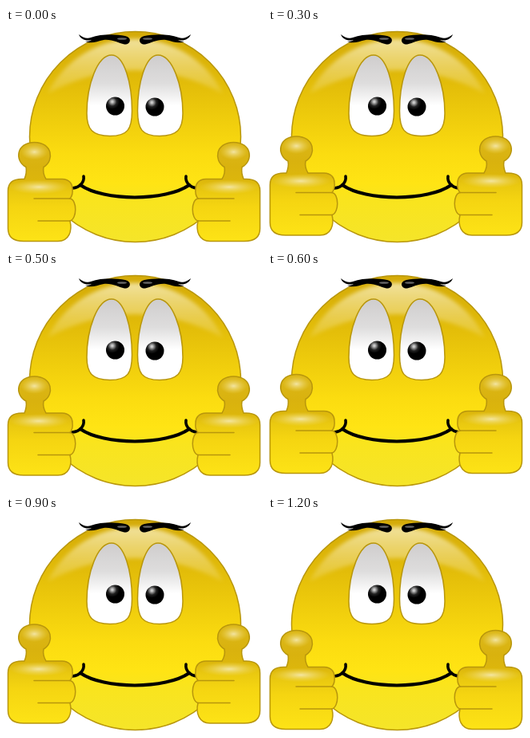
An HTML page for the animation above (1.3 s loop, 320x271 px).

```html
<!DOCTYPE html>
<html lang="en">
<meta charset="utf-8">
<title>Thumbs up</title>
<style>
html, body { margin: 0; height: 100%; overflow: hidden; background: #fff; }
svg { display: block; width: 320px; height: 271px; }
</style>
<svg viewBox="0 0 320 271">
  <defs>
    <linearGradient id="skin" x2="0" y2="1">
      <stop stop-color="#d4aa08"/>
      <stop offset=".2" stop-color="#dfb808"/>
      <stop offset=".4" stop-color="#eecb0c"/>
      <stop offset=".58" stop-color="#fbdc10"/>
      <stop offset=".72" stop-color="#ffe414"/>
      <stop offset=".8" stop-color="#f9e41e"/>
      <stop offset="1" stop-color="#f5e529"/>
    </linearGradient>
    <linearGradient id="shine" x2="0" y2="1">
      <stop stop-color="#f6ebb6" stop-opacity=".85"/>
      <stop offset="1" stop-color="#f3e08a" stop-opacity=".25"/>
    </linearGradient>
    <linearGradient id="white" x2="0" y2="1">
      <stop stop-color="#cfcdcd"/>
      <stop offset=".35" stop-color="#dedddd"/>
      <stop offset=".62" stop-color="#fff"/>
    </linearGradient>
    <linearGradient id="glove" x2="0" y2="1">
      <stop stop-color="#dcb81a"/>
      <stop offset=".25" stop-color="#d9b20e"/>
      <stop offset=".38" stop-color="#dcb60c"/>
      <stop offset=".5" stop-color="#eac910"/>
      <stop offset=".65" stop-color="#f5d511"/>
      <stop offset="1" stop-color="#fde316"/>
    </linearGradient>
    <radialGradient id="glow">
      <stop stop-color="#f5e9b0" stop-opacity=".9"/>
      <stop offset="1" stop-color="#f0d860" stop-opacity="0"/>
    </radialGradient>
    <radialGradient id="ball" cx=".34" cy=".26" r=".4">
      <stop offset=".1" stop-color="#ccc"/>
      <stop offset=".6" stop-color="#222"/>
      <stop offset="1" stop-color="#000"/>
    </radialGradient>
    <filter id="soft"><feGaussianBlur stdDeviation="2.5"/></filter>
    <g id="half">
      <path fill="url(#white)" stroke="#b8960c" stroke-width="1.5" d="M132 34C148 34 157.5 70 157.5 104C157.5 127 152 135.5 130 135.5C108 135.5 101 127 101 107C101 72 114 34 132 34Z"/>
      <path d="M91 8C96 12 101 14 106 12C120 7 138 8 149 10C158 12 156 21 148 20.5C140 19 134 14 122 15C113 17 107 20 99 17C103 17 106 16 107 15C100 17 93 14 91 8Z"/>
      <ellipse cx="145" cy="13.5" rx="6" ry="1.3" fill="#666"/>
      <path fill="none" stroke="#000" stroke-width="3.6" stroke-linecap="round" d="M97 186C98 193 93 200 83 201"/>
    </g>
    <g id="hand" stroke="#b8960c" stroke-width="1.5" stroke-linecap="round">
      <path fill="url(#glove)" d="M23 47C25 42 26 37 25 32C10 24 13 1 35.5 1C58 1 61 24 47 32C46 37 47 42 50 47H70C79 47 83 53 83 59Q84 67 80 71.5C89 73 89 97 80 99.5C83 112 79 125 65 125H22C9 125 2.5 119 2.5 109V62C2.5 52 8 46 23 47Z"/>
      <path fill="none" d="M35 71.5H80M40 99.5H80"/>
      <g fill="url(#glow)" stroke="none">
        <ellipse cx="35.5" cy="13" rx="17" ry="10"/>
        <ellipse cx="41" cy="57" rx="37" ry="9"/>
      </g>
    </g>
  </defs>
  <circle cx="161.5" cy="136.5" r="132" fill="url(#skin)" stroke="#b8960c" stroke-width="1.5"/>
  <path fill="url(#shine)" filter="url(#soft)" d="M52 82A122 122 0 0 1 271 82Q161.5 24 52 82Z"/>
  <use href="#half"/>
  <use href="#half" transform="matrix(-1 0 0 1 322 0)"/>
  <circle cx="136.5" cy="98" r="11.5" fill="url(#ball)"/>
  <circle cx="186" cy="99" r="11.5" fill="url(#ball)"/>
  <path fill="none" stroke="#000" stroke-width="4" stroke-linecap="round" d="M93 197C122 217.5 200 217.5 229 197"/>
  <use href="#hand" class="hand"/>
  <g transform="matrix(-1 0 0 1 320 0)"><use href="#hand" class="hand"/></g>
</svg>
<script>
const hands = document.querySelectorAll('.hand');

// Hands rise in six even steps, then sink back.
function draw(now) {
  const step = Math.floor(now % 1300 / 100);
  const lift = 2.5 * Math.min(step, 12 - step);
  hands.forEach(hand => hand.setAttribute('transform', `translate(0 ${142.5 - lift})`));
}

const start = performance.now();
function tick() {
  draw(performance.now() - start);
  requestAnimationFrame(tick);
}
tick();
</script>
</html>
```
